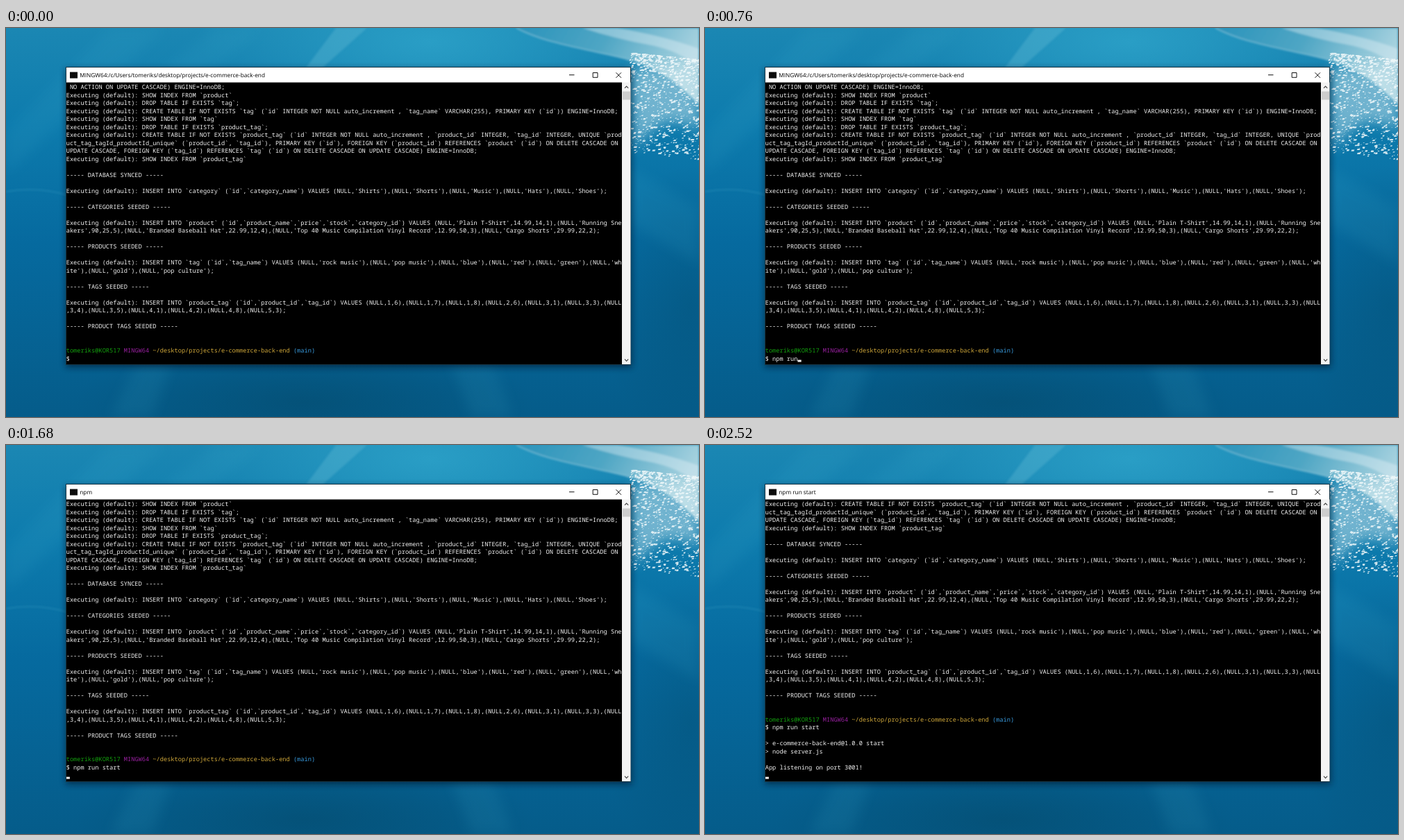
Recreate the animation shown at these times as an HTML page. Size 998x561 px, loop 2560 ms.

```html
<!DOCTYPE html>
<html lang="en">
<head>
<meta charset="utf-8">
<title>Terminal</title>
<style>
html, body { margin: 0; width: 100%; height: 100%; overflow: hidden; background: #07699c; }
svg { display: block; width: 100vw; height: 100vh; }
text { white-space: pre; text-rendering: geometricPrecision; }
#log text { font: 8.66px "Noto Sans Mono", "DejaVu Sans Mono", monospace; fill: #f2f2f2; }
#title { font: 8.25px "Open Sans", "Noto Sans", sans-serif; fill: #000; }
</style>
</head>
<body>
<svg viewBox="0 0 998 561">
  <defs>
    <linearGradient id="sea" x1="0" y1="0" x2="0" y2="1">
      <stop offset="0" stop-color="#1b87b3"/>
      <stop offset=".25" stop-color="#0d7bad"/>
      <stop offset=".55" stop-color="#066a9f"/>
      <stop offset="1" stop-color="#055c8a"/>
    </linearGradient>
    <radialGradient id="glow">
      <stop offset="0" stop-color="#2fa6cc" stop-opacity=".75"/>
      <stop offset="1" stop-color="#2fa6cc" stop-opacity="0"/>
    </radialGradient>
    <radialGradient id="deep">
      <stop offset="0" stop-color="#044a6c" stop-opacity=".6"/>
      <stop offset="1" stop-color="#044a6c" stop-opacity="0"/>
    </radialGradient>
    <linearGradient id="crest" x1="0" y1="0" x2="1" y2=".25">
      <stop offset="0" stop-color="#2a93bb"/>
      <stop offset=".5" stop-color="#4fa6c4"/>
      <stop offset="1" stop-color="#a9d3e0"/>
    </linearGradient>
    <filter id="soft" x="-30%" y="-30%" width="160%" height="160%"><feGaussianBlur stdDeviation="9"/></filter>
    <filter id="fine" x="-20%" y="-20%" width="140%" height="140%"><feGaussianBlur stdDeviation="1.6"/></filter>
    <filter id="shade" x="-5%" y="-5%" width="110%" height="115%"><feGaussianBlur stdDeviation="5"/></filter>
    <clipPath id="screen"><rect x="87" y="78.5" width="800" height="406.5"/></clipPath>
  </defs>

  <rect width="998" height="561" fill="url(#sea)"/>
  <ellipse cx="610" cy="20" rx="330" ry="130" fill="url(#glow)"/>
  <ellipse cx="430" cy="540" rx="330" ry="90" fill="url(#deep)"/>
  <ellipse cx="985" cy="400" rx="130" ry="200" fill="url(#deep)" opacity=".6"/>
  <g filter="url(#soft)" fill="#3fadcf" opacity=".12">
    <path d="M150 0H230L100 120 0 210V150Z"/>
    <path d="M300 0H370L260 90H190Z"/>
    <path d="M190 480H240L210 561H150Z"/>
    <path d="M640 480H700L730 561H670Z"/>
    <path d="M895 200 998 260V340L895 280Z"/>
  </g>
  <g filter="url(#fine)">
    <path d="M475 0H520L456 57H432Z" fill="#7bcbe0" opacity=".25"/>
    <path d="M0 236Q45 228 88 241" fill="none" stroke="#4eb0d0" stroke-width="2" opacity=".25"/>
    <path d="M735 0C775 22 835 30 890 44S970 82 998 110V0Z" fill="url(#crest)"/>
    <path d="M735 0C775 22 835 30 890 44S970 82 998 110" fill="none" stroke="#b8e0ea" stroke-width="1.5" opacity=".45"/>
    <path d="M830 0Q880 16 925 24T998 58V30Q950 12 880 0Z" fill="#e4f1f4" opacity=".4"/>
  </g>
  <path d="M900 60Q960 50 998 60V150Q950 110 905 175Z" fill="#cfe8ef" opacity=".5" filter="url(#soft)"/>
  <path id="spray" fill="#f3fafb" opacity=".85"/>

  <rect x="86" y="59" width="815" height="430" fill="#00182a" opacity=".65" filter="url(#shade)"/>
  <rect x="86.5" y="56.5" width="813" height="429" fill="#fff" stroke="#173746" stroke-width="1"/>
  <rect x="87" y="78.5" width="800" height="406.5" fill="#000"/>
  <rect x="92" y="63.5" width="11" height="9" fill="#0b0b0b"/>
  <text id="title" x="106.3" y="71"></text>
  <path d="M811 67.7H818.5M845.2 64.5H852V71.3H845.2ZM878.5 64.3 886 71.8M886 64.3 878.5 71.8" fill="none" stroke="#111" stroke-width="1"/>
  <rect x="887" y="78.5" width="12.5" height="406.5" fill="#f3f3f3"/>
  <rect x="888" y="91.5" width="11" height="12" fill="#cdcdcd"/>
  <path d="M891 86.6 893.6 84 896.2 86.6M891 477.7 893.6 480.3 896.2 477.7" fill="none" stroke="#444" stroke-width="1.2"/>
  <g clip-path="url(#screen)">
    <g id="log"></g>
    <rect id="cursor" y="478.6" width="5.2" height="3" fill="#f2f2f2"/>
  </g>
</svg>
<script>
const LOOP = 2560, COLS = 154, LEFT = 86.7, CHAR = 5.196, ROW = 11.515, BASE = 88;
const FOLDER = "desktop/projects/e-commerce-back-end";
const COMMAND = "npm run start";
const ENTER = 1320, OUTPUT = 1920, READY = 2440;
const $ = id => document.getElementById(id);
const run = sql => "Executing (default): " + sql;
const banner = label => ["", "----- " + label + " SEEDED -----", ""];

const history = [
  " NO ACTION ON UPDATE CASCADE) ENGINE=InnoDB;",
  run("SHOW INDEX FROM `product`"),
  run("DROP TABLE IF EXISTS `tag`;"),
  run("CREATE TABLE IF NOT EXISTS `tag` (`id` INTEGER NOT NULL auto_increment , `tag_name` VARCHAR(255), PRIMARY KEY (`id`)) ENGINE=InnoDB;"),
  run("SHOW INDEX FROM `tag`"),
  run("DROP TABLE IF EXISTS `product_tag`;"),
  run("CREATE TABLE IF NOT EXISTS `product_tag` (`id` INTEGER NOT NULL auto_increment , `product_id` INTEGER, `tag_id` INTEGER, "
    + "UNIQUE `product_tag_tagId_productId_unique` (`product_id`, `tag_id`), PRIMARY KEY (`id`), "
    + "FOREIGN KEY (`product_id`) REFERENCES `product` (`id`) ON DELETE CASCADE ON UPDATE CASCADE, "
    + "FOREIGN KEY (`tag_id`) REFERENCES `tag` (`id`) ON DELETE CASCADE ON UPDATE CASCADE) ENGINE=InnoDB;"),
  run("SHOW INDEX FROM `product_tag`"),
  "", "----- DATABASE SYNCED -----", "",
  run("INSERT INTO `category` (`id`,`category_name`) VALUES (NULL,'Shirts'),(NULL,'Shorts'),(NULL,'Music'),(NULL,'Hats'),(NULL,'Shoes');"),
  ...banner("CATEGORIES"),
  run("INSERT INTO `product` (`id`,`product_name`,`price`,`stock`,`category_id`) VALUES (NULL,'Plain T-Shirt',14.99,14,1),"
    + "(NULL,'Running Sneakers',90,25,5),(NULL,'Branded Baseball Hat',22.99,12,4),"
    + "(NULL,'Top 40 Music Compilation Vinyl Record',12.99,50,3),(NULL,'Cargo Shorts',29.99,22,2);"),
  ...banner("PRODUCTS"),
  run("INSERT INTO `tag` (`id`,`tag_name`) VALUES (NULL,'rock music'),(NULL,'pop music'),(NULL,'blue'),(NULL,'red'),"
    + "(NULL,'green'),(NULL,'white'),(NULL,'gold'),(NULL,'pop culture');"),
  ...banner("TAGS"),
  run("INSERT INTO `product_tag` (`id`,`product_id`,`tag_id`) VALUES (NULL,1,6),(NULL,1,7),(NULL,1,8),(NULL,2,6),(NULL,3,1),"
    + "(NULL,3,3),(NULL,3,4),(NULL,3,5),(NULL,4,1),(NULL,4,2),(NULL,4,8),(NULL,5,3);"),
  ...banner("PRODUCT TAGS"), ""
];

function svg(tag, parent, attrs, text = "") {
  const el = document.createElementNS("http://www.w3.org/2000/svg", tag);
  for (const key in attrs) el.setAttribute(key, attrs[key]);
  el.textContent = text;
  return parent.appendChild(el);
}

let rows = 0;
const addRow = text => svg("text", $("log"), { x: LEFT, y: BASE + ROW * rows++ }, text);

for (const line of history) {
  for (let i = 0; i === 0 || i < line.length; i += COLS) addRow(line.slice(i, i + COLS));
}
const prompt = addRow("");
[["tomeriks@KOR517 ", "#13a10e"], ["MINGW64 ", "#98209f"], ["~/" + FOLDER + " ", "#d0a83a"], ["(main)", "#3a9fe4"]]
  .forEach(([text, color]) => svg("tspan", prompt, { style: "fill:" + color }, text));
const input = addRow("$ ");
const output = ["", "> e-commerce-back-end@1.0.0 start", "> node server.js", ""].map(addRow);
const ready = addRow("App listening on port 3001!");

// Seeded spray: flecks thin out downwards and to the left
let seed = 7;
const rand = () => (seed = seed * 16807 % 2147483647) / 2147483647;
let spray = "";
for (let i = 0; i < 1100; i++) {
  const x = 998 - 100 * rand() ** 1.1;
  const y = 45 + 145 * rand() ** 1.7 - (998 - x) * .1;
  const h = .6 + 2 * rand() ** 2;
  const w = h * (1 + rand());
  spray += `M${x.toFixed(1)} ${y.toFixed(1)}h${w.toFixed(1)}l-1 ${h.toFixed(1)}h${(-w).toFixed(1)}z`;
}
$("spray").setAttribute("d", spray);

function typed(t) {
  const n = t < 520 ? Math.floor((t - 120) / 80) : Math.floor((t - 160) / 80);
  return COMMAND.slice(0, Math.max(0, n));
}

function titleAt(t) {
  if (t < 1560) return "MINGW64:/c/Users/tomeriks/" + FOLDER;
  return t < 1880 ? "npm" : COMMAND;
}

function draw(t) {
  const line = "$ " + typed(t);
  const scroll = t < ENTER ? 0 : t < OUTPUT ? 1 : t < READY ? 5 : 6;
  input.textContent = line;
  $("title").textContent = titleAt(t);
  $("log").setAttribute("transform", `translate(0 ${-ROW * scroll})`);
  output.forEach(el => el.setAttribute("visibility", t < OUTPUT ? "hidden" : "visible"));
  ready.setAttribute("visibility", t < READY ? "hidden" : "visible");
  $("cursor").setAttribute("x", LEFT + (t < ENTER ? line.length * CHAR : 0));
  $("cursor").setAttribute("visibility", t < 200 ? "hidden" : "visible");
}

const start = performance.now();
function tick() {
  draw((performance.now() - start) % LOOP);
  requestAnimationFrame(tick);
}
tick();
</script>
</body>
</html>
```
